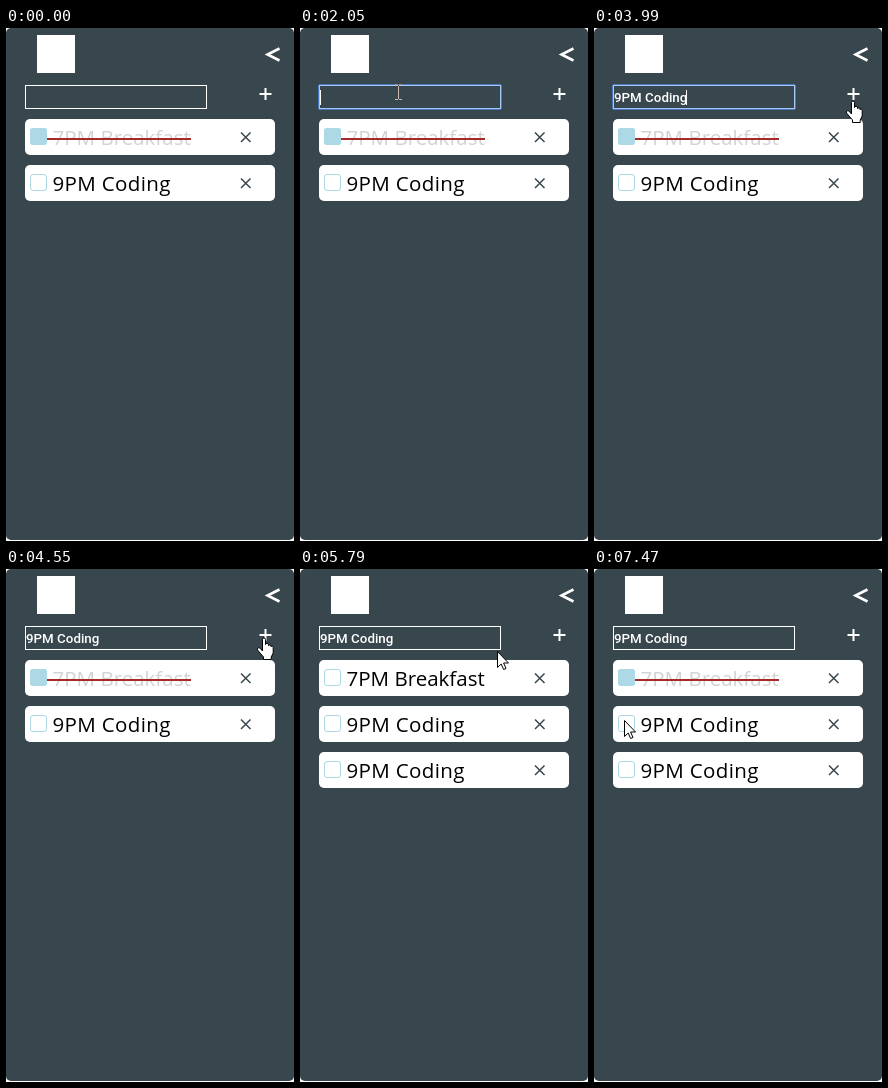
An HTML page for the animation above (8000 ms loop, 288 by 513 pixels).

```html
<!DOCTYPE html>
<html lang="en">
<head>
<meta charset="utf-8">
<title>Task list</title>
<style>
html, body { margin: 0; width: 100%; height: 100%; overflow: hidden; background: #fff; }
svg { display: block; width: 288px; height: 513px; }
.label { font: 20.5px "Open Sans", "Noto Sans", sans-serif; }
.loose { letter-spacing: .35px; }
.entry { font: 500 13.33px Roboto, Arial, sans-serif; fill: #fff; }
.line { fill: none; stroke: #fff; }
.pointer { fill: #fff; stroke: #000; stroke-linejoin: round; }
.beam { fill: none; stroke: #fff; mix-blend-mode: difference; }

/* every state switches hard, so all timelines hold until the next key */
.anim { animation: 8s step-end infinite; }
.focus { animation-name: focus; }
.caret-start { animation-name: caret-start; }
.caret-end { animation-name: caret-end; }
.typed { animation-name: typed; }
.added { animation-name: added; }
.done { animation-name: done; }
.dim { animation-name: dim; }
.arrow { animation-name: move, arrow; }
.beam { animation-name: move, beam; }
.hand { animation-name: move, hand; }

@keyframes focus {
  0%, 56.875%, 100% { opacity: 0; }
  25.625% { opacity: 1; }
}
@keyframes caret-start {
  0%, 32.625%, 100% { opacity: 0; }
  25.625% { opacity: 1; }
}
@keyframes caret-end {
  0%, 43.125%, 56.875%, 100% { opacity: 0; }
  36.5%, 49.875% { opacity: 1; }
}
@keyframes typed { 0% { opacity: 0; } 36.5%, 100% { opacity: 1; } }
@keyframes added { 0% { opacity: 0; } 58.75%, 100% { opacity: 1; } }
@keyframes done {
  0%, 89.625%, 100% { opacity: 1; }
  58.75% { opacity: 0; }
}
@keyframes dim {
  0%, 89.625%, 100% { fill: #d3d3d3; }
  58.75% { fill: #000; }
}
@keyframes arrow {
  0%, 22%, 49.875%, 75.875% { opacity: 0; }
  17.5%, 45%, 68.875%, 81%, 100% { opacity: 1; }
}
@keyframes beam {
  0%, 45%, 81%, 100% { opacity: 0; }
  22%, 75.875% { opacity: 1; }
}
@keyframes hand {
  0%, 68.875%, 100% { opacity: 0; }
  49.875% { opacity: 1; }
}
@keyframes move {
  0%, 17.5% { transform: translate(266px, 158px); }
  19% { transform: translate(215px, 118px); }
  20.5% { transform: translate(150px, 84px); }
  22% { transform: translate(100px, 60px); }
  23.875% { transform: translate(95px, 56px); }
  41.625% { transform: translate(113px, 62px); }
  43.125% { transform: translate(144px, 69px); }
  45% { transform: translate(184px, 82px); }
  46.5% { transform: translate(211px, 86px); }
  48% { transform: translate(240px, 78px); }
  49.875% { transform: translate(251px, 72px); }
  51.5% { transform: translate(250px, 68px); }
  67% { transform: translate(249px, 69px); }
  68.875% { transform: translate(241px, 70px); }
  70.5% { transform: translate(225px, 72px); }
  72.375% { transform: translate(197px, 82px); }
  74.25% { transform: translate(132px, 90px); }
  75.875% { transform: translate(74px, 101px); }
  77.75% { transform: translate(56px, 102px); }
  79.25% { transform: translate(40px, 103px); }
  81% { transform: translate(35px, 110px); }
  91.5% { transform: translate(35px, 116px); }
  93.375%, 100% { transform: translate(30px, 151px); }
}
</style>
</head>
<body>
<svg viewBox="0 0 288 513">
  <defs>
    <g id="card">
      <rect x="19" y="91" width="250" height="36" rx="5" fill="#fff"/>
      <rect x="24.5" y="100.5" width="16" height="16" rx="2.5" fill="#fff" stroke="#add8e6"/>
      <path d="M235 104.5l9.5 9.5m0-9.5l-9.5 9.5" fill="none" stroke="#38464d" stroke-width="1.5"/>
    </g>
  </defs>

  <rect width="288" height="513" fill="#fff"/>
  <rect width="288" height="512" rx="5" fill="#38464d"/>

  <!-- header -->
  <rect x="31" y="7" width="38" height="38" fill="#fff"/>
  <path class="line" d="M273.5 20.5L261.5 26.5 273.5 32.5" stroke-width="2.6"/>
  <path class="line" d="M253.5 66h12M259.5 60v12" stroke-width="2"/>

  <!-- entry field -->
  <rect x="19.5" y="57.5" width="181" height="23" fill="none" stroke="#fff"/>
  <g class="anim focus" fill="none">
    <rect x="18.5" y="56.5" width="183" height="25" rx="1" stroke="#4a78c0"/>
    <rect x="19.5" y="57.5" width="181" height="23" stroke="#a9c8f5"/>
  </g>
  <text class="entry anim typed" x="20" y="74">9PM Coding</text>
  <rect class="anim caret-start" x="20" y="62" width="1" height="15" fill="#fff"/>
  <rect class="anim caret-end" x="92" y="62" width="1" height="15" fill="#fff"/>

  <!-- tasks -->
  <use href="#card"/>
  <text class="label anim dim" x="46.5" y="117">7PM Breakfast</text>
  <g class="anim done">
    <rect x="24" y="100" width="17" height="17" rx="3" fill="#add8e6"/>
    <rect x="41" y="110" width="144" height="2" fill="#a52a2a"/>
  </g>
  <use href="#card" y="46"/>
  <text class="label loose" x="46.5" y="163">9PM Coding</text>
  <g class="anim added">
    <use href="#card" y="92"/>
    <text class="label loose" x="46.5" y="209">9PM Coding</text>
  </g>

  <!-- pointer shapes -->
  <path class="pointer anim arrow" d="M.5 .5V16.5L4.2 13 6.6 18.5 9 17.5 6.6 12H11.5z"/>
  <path class="anim beam" d="M0 .5h3m1 0h3M3.5 1v14M0 15.5h3m1 0h3"/>
  <path class="pointer anim hand" d="M6.5 14V2.5a1.5 1.5 0 0 1 3 0V7.5a1.5 1.3 0 0 1 3 .4v.6a1.4 1.2 0 0 1 2.5 .5v.7a1.2 1.2 0 0 1 2.2 .8V16l-2 4v2.5H7.5V20L1.5 13a1.6 1.6 0 0 1 2.4-2z"/>
</svg>
</body>
</html>
```
